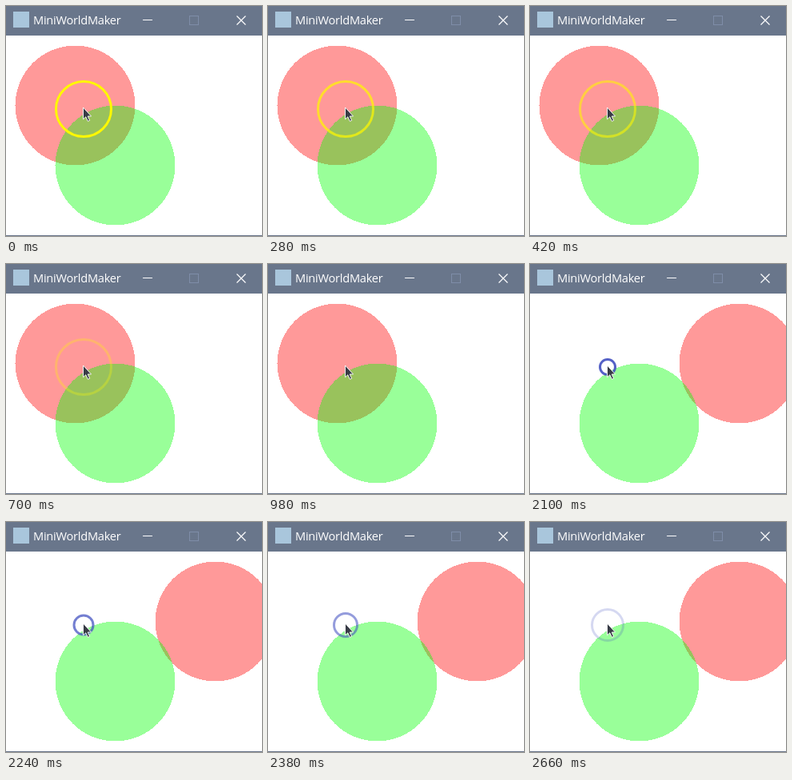
Write an HTML page that moves like this. It is 320 px wide and 288 px high and loops after 2800 ms.

```html
<!DOCTYPE html>
<html lang="en">
<head>
<meta charset="utf-8">
<title>MiniWorldMaker</title>
<style>
  html, body { margin: 0; width: 100%; height: 100%; overflow: hidden; background: #fff; }
  svg { display: block; width: 320px; height: 288px; }
  text { font: 14.6px "Open Sans", "Noto Sans", sans-serif; letter-spacing: -.25px; fill: #fff; }
</style>
</head>
<body>
<svg viewBox="0 0 320 288">
  <rect width="320" height="288" fill="#fff"/>
  <g shape-rendering="crispEdges" fill-opacity=".4">
    <circle id="red" cx="86.5" cy="124.5" r="75" fill="#f00"/>
    <circle cx="136.5" cy="199.5" r="75" fill="#0f0"/>
  </g>
  <circle id="ring" cx="97" cy="129" fill="none" stroke-width="3"/>
  <path d="M96.5 127v14.8l3.3-3 2.5 5.5 2.3-1-2.4-5.3h4.3z" fill="#383c46" stroke="#fff" stroke-width=".9"/>

  <rect width="320" height="37" fill="#69768b"/>
  <rect y="287" width="320" height="1" fill="#69768b"/>
  <rect x="9" y="7" width="20" height="20" fill="#a9c6dc"/>
  <text x="34" y="23">MiniWorldMaker</text>
  <g fill="none" stroke="#fff">
    <path d="M171 17.5h12"/>
    <rect x="229.5" y="12.5" width="11" height="11" stroke="#7f8da8"/>
    <path d="M288.5 12.5l11 11m0-11l-11 11" stroke-width="1.2"/>
  </g>
</svg>
<script>
  const LOOP = 2800, STEP = 140;
  const PRESS = 1960, MOVE = 2100, GONE = 980;
  const red = document.getElementById('red');
  const ring = document.getElementById('ring');

  function setRing(radius, color, opacity) {
    ring.setAttribute('r', radius);
    ring.setAttribute('stroke', color);
    ring.setAttribute('stroke-opacity', opacity);
  }

  // The picture advances in whole steps, without in-betweens.
  function draw(time) {
    const t = Math.floor((time % LOOP) / STEP) * STEP;
    red.setAttribute('cx', t < MOVE ? 86.5 : 261.5);

    if (t < PRESS) {
      setRing(34.5, '#fff800', Math.max(0, 1 - t / GONE));
    } else {
      const steps = Math.max(0, t - MOVE) / STEP;
      const opacity = t < MOVE ? 0.96 : 0.9 - 0.17 * steps;
      setRing(9.5 + 2.5 * steps, '#414fc0', opacity);
    }
  }

  const start = performance.now();
  function tick() {
    draw(performance.now() - start);
    requestAnimationFrame(tick);
  }
  tick();
</script>
</body>
</html>
```
